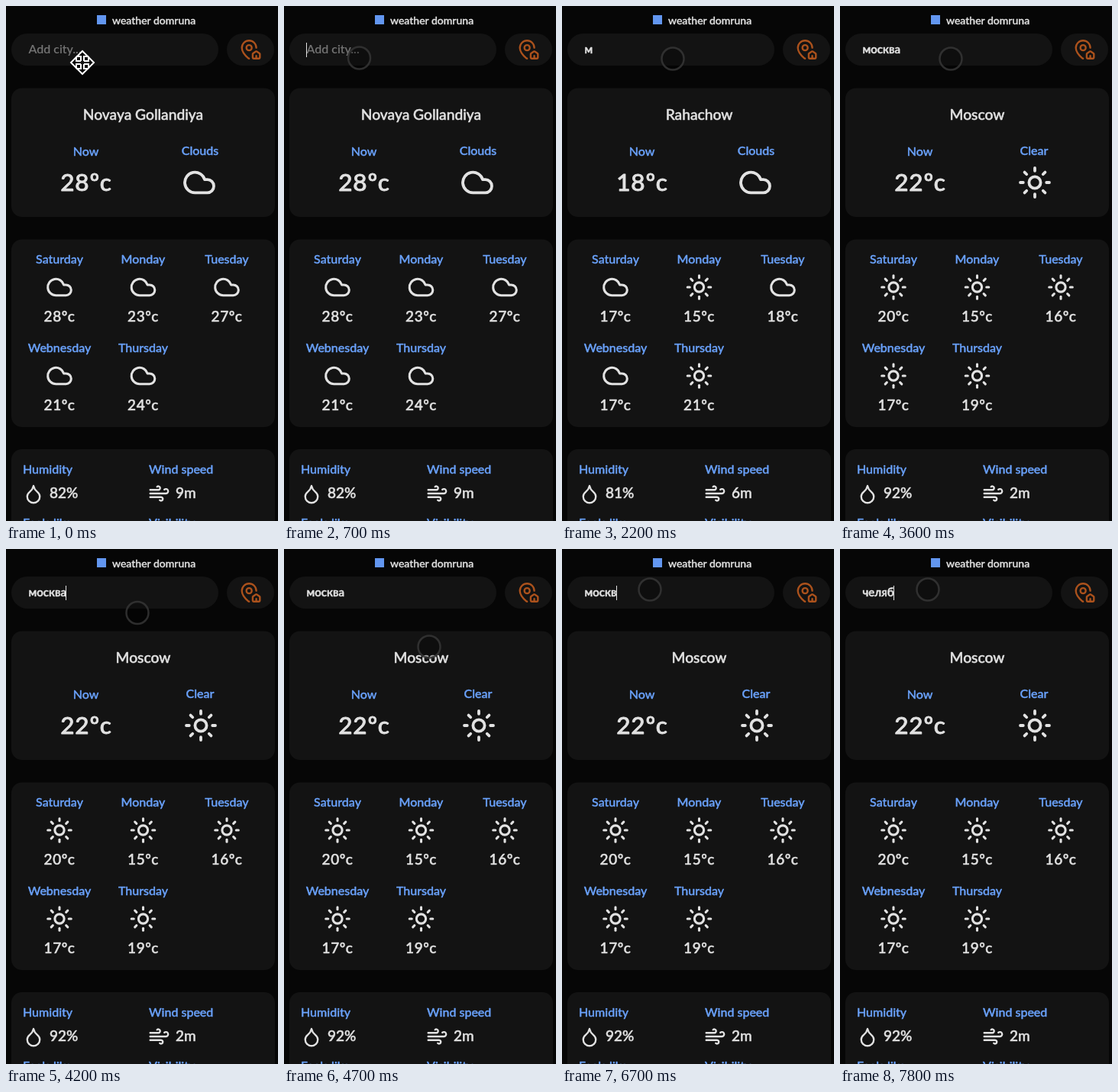
These frames come from a looping animation (356 px wide and 674 px high, 8 s). An HTML page:

```html
<!DOCTYPE html>
<html lang="en">
<head>
<meta charset="utf-8">
<title>Weather</title>
<style>
  html, body { margin: 0; width: 100%; height: 100%; overflow: hidden; background: #060606; }
  svg { display: block; width: 356px; height: 674px; font: 500 16px Lato, "Noto Sans", sans-serif; }
  text { color: #e2e2e2; fill: currentColor; stroke: currentColor; stroke-width: .027em; stroke-linejoin: round; }
  .mid { text-anchor: middle; }
  .label { color: #6aa2fb; }
  .card { fill: #131313; }
  .icon { fill: none; stroke: #e2e2e2; stroke-width: 2; stroke-linecap: round; stroke-linejoin: round; }
  #hint { font-size: 16px; color: #757575; stroke-width: .01em; }
  #query { font-size: 15px; font-weight: 600; stroke-width: .035em; }
</style>
</head>
<body>
<svg id="stage" viewBox="0 0 356 674"></svg>
<script>
const LOOP = 8000, STEP = 100, BLINK = 500;

const icons = {
  cloud: '<path d="M17.5 19H9a7 7 0 1 1 6.71-9h1.79a4.5 4.5 0 1 1 0 9Z"/>',
  sun: '<circle cx="12" cy="12" r="4"/>' + [0, 45, 90, 135, 180, 225, 270, 315]
    .map(a => `<path d="M12 2v2" transform="rotate(${a} 12 12)"/>`).join(''),
  drop: '<path d="M12 22a7 7 0 0 0 7-7c0-2-1-3.9-3-5.5s-3.5-4-4-6.5c-.5 2.5-2 4.9-4 6.5C6 11.1 5 13 5 15a7 7 0 0 0 7 7z"/>',
  wind: '<path d="M17.7 7.7a2.5 2.5 0 1 1 1.8 4.3H2M9.6 4.6A2 2 0 1 1 11 8H2M12.6 19.4A2 2 0 1 0 14 16H2"/>',
  home: '<path d="M15 22a1 1 0 0 1-1-1v-4a1 1 0 0 1 .445-.832l3-2a1 1 0 0 1 1.11 0l3 2A1 1 0 0 1 22 17v4a1 1 0 0 1-1 1zM18 10a8 8 0 0 0-16 0c0 4.993 5.539 10.193 7.399 11.799a1 1 0 0 0 .601.2M18 22v-3"/><circle cx="10" cy="10" r="3"/>'
};

const cities = [
  { from: 0, name: 'Novaya Gollandiya', now: 28, sky: 'cloud', days: [28, 23, 27, 21, 24], suns: '00000', wet: 82, wind: 9 },
  { from: 2000, name: 'Rahachow', now: 18, sky: 'cloud', days: [17, 15, 18, 17, 21], suns: '01001', wet: 81, wind: 6 },
  { from: 3600, name: 'Moscow', now: 22, sky: 'sun', days: [20, 15, 16, 17, 19], suns: '11111', wet: 92, wind: 2 }
];
const dayNames = ['Saturday', 'Monday', 'Tuesday', 'Webnesday', 'Thursday'];

// Contents of the search field; every entry restarts the caret blink.
const typed = [
  [700, ''], [1300, 'м'], [2300, 'мо'], [2400, 'мос'], [2500, 'моск'], [2700, 'москв'], [2800, 'москва'],
  [6700, 'москв'], [6800, 'моск'], [6900, 'мос'], [7000, 'м'], [7100, ''],
  [7300, 'ч'], [7500, 'че'], [7600, 'чел'], [7700, 'челя'], [7800, 'челяб']
];

// Pointer path: time, x, y
const path = [
  [100, 99, 70], [200, 99, 70], [500, 98.5, 68], [700, 98.5, 68], [1000, 147, 68.5], [1200, 147, 69], [1400, 145, 69],
  [3600, 145, 69], [4000, 160, 72], [4400, 184, 95], [4700, 190, 128], [4900, 244, 220], [5000, 255, 275],
  [5200, 208, 324], [5400, 132, 251], [5500, 140, 285], [5700, 182, 333], [5800, 196, 325],
  [5999, 196, 325], [6000, 115, 53], [LOOP, 115, 53]
];

const text = (x, y, str, size = 16, cls = '', extra = '') =>
  `<text x="${x}" y="${y}" class="${cls}" style="font-size:${size}px;${extra}">${str}</text>`;
const temp = (x, y, n, size, gap) => text(x, y, n + 'ºc', size, 'mid', `letter-spacing:${gap}px`);
const icon = (name, x, y, k, color = '#e2e2e2') =>
  `<g class="icon" style="stroke:${color}" transform="translate(${x} ${y}) scale(${k}) translate(-12 -12)">${icons[name]}</g>`;
const card = (x, y, w, h, r) => `<rect class="card" x="${x}" y="${y}" width="${w}" height="${h}" rx="${r}"/>`;

function report(c) {
  const days = dayNames.map((day, i) => {
    const x = 70 + i % 3 * 109.5, y = i < 3 ? 0 : 116;
    return text(x, 337 + y, day, 16, 'mid label')
      + icon(+c.suns[i] ? 'sun' : 'cloud', x, 368 + y, 1.53)
      + temp(x, 413 + y, c.days[i], 19, .5);
  }).join('');
  return text(179.5, 149, c.name, 19.2, 'mid')
    + temp(105, 241.5, c.now, 31.5, .8)
    + text(254, 195, c.sky === 'sun' ? 'Clear' : 'Clouds', 16, 'mid label')
    + icon(c.sky, c.sky === 'sun' ? 255 : 253, 231, 1.9)
    + days
    + text(57, 644, c.wet + '%', 19)
    + text(222, 644, c.wind + 'm', 19);
}

const arrows = [0, 90, 180, 270].map(a =>
  `<path d="M-2-2V-8H-7L0-15 7-8H2V-2" transform="rotate(${a})"/>`).join('');

stage.innerHTML = `
  <rect x="119" y="12" width="12" height="12" fill="#6296f0"/>
  ${text(139, 24, 'weather domruna', 14)}
  ${card(7, 36, 271, 42, 21)}${card(289, 36, 62, 42, 21)}
  ${card(7, 107.5, 345, 168.5, 14)}${card(7, 305.5, 345, 245.5, 14)}${card(7, 580, 345, 120, 14)}
  ${icon('home', 320.5, 57, 1.18, '#ac521c')}
  ${text(104.5, 196, 'Now', 16, 'mid label')}
  ${text(22, 612, 'Humidity', 16, 'label')}${text(187, 612, 'Wind speed', 16, 'label')}
  ${text(22, 682, 'Feels like', 16, 'label')}${text(187, 682, 'Visibility', 16, 'label')}
  ${icon('drop', 36, 638.5, 1.18)}${icon('wind', 200.5, 638, 1.18)}
  ${cities.map(c => `<g class="city">${report(c)}</g>`).join('')}
  <text id="hint" x="29.5" y="62">Add city...</text>
  <text id="query" x="29.5" y="62"></text>
  <rect id="caret" y="48" width="1" height="19" fill="#e2e2e2"/>
  <g id="move" transform="translate(100 74)" stroke="#fff" stroke-width="2">${arrows}</g>
  <circle id="ring" r="14.5" fill="#000" fill-opacity=".25" stroke="#363636" stroke-opacity=".85" stroke-width="2.5"/>`;

const el = id => document.getElementById(id);
const [hint, query, caret, move, ring] = ['hint', 'query', 'caret', 'move', 'ring'].map(el);
const groups = document.querySelectorAll('.city');
const show = (node, on) => node.setAttribute('visibility', on ? 'visible' : 'hidden');

function pointAt(t) {
  const i = Math.max(1, path.findIndex(p => p[0] > t));
  const a = path[i - 1], b = path[i], k = Math.max(0, (t - a[0]) / (b[0] - a[0]));
  return [a[1] + (b[1] - a[1]) * k, a[2] + (b[2] - a[2]) * k];
}

function draw(now) {
  const t = Math.floor(now % LOOP / STEP) * STEP;
  const city = cities.findLastIndex(c => c.from <= t);
  groups.forEach((g, i) => show(g, i === city));

  const entry = typed.findLast(e => e[0] <= t);
  const str = entry ? entry[1] : '';
  query.textContent = str;
  show(hint, !str);
  show(caret, entry && Math.floor((t - entry[0]) / BLINK) % 2 === 0);
  caret.setAttribute('x', Math.round(29 + (str ? query.getComputedTextLength() : 0)));

  show(move, t < 100);
  show(ring, t >= 100);
  ring.setAttribute('transform', `translate(${pointAt(t)})`);
  requestAnimationFrame(draw);
}
requestAnimationFrame(draw);
</script>
</body>
</html>
```
